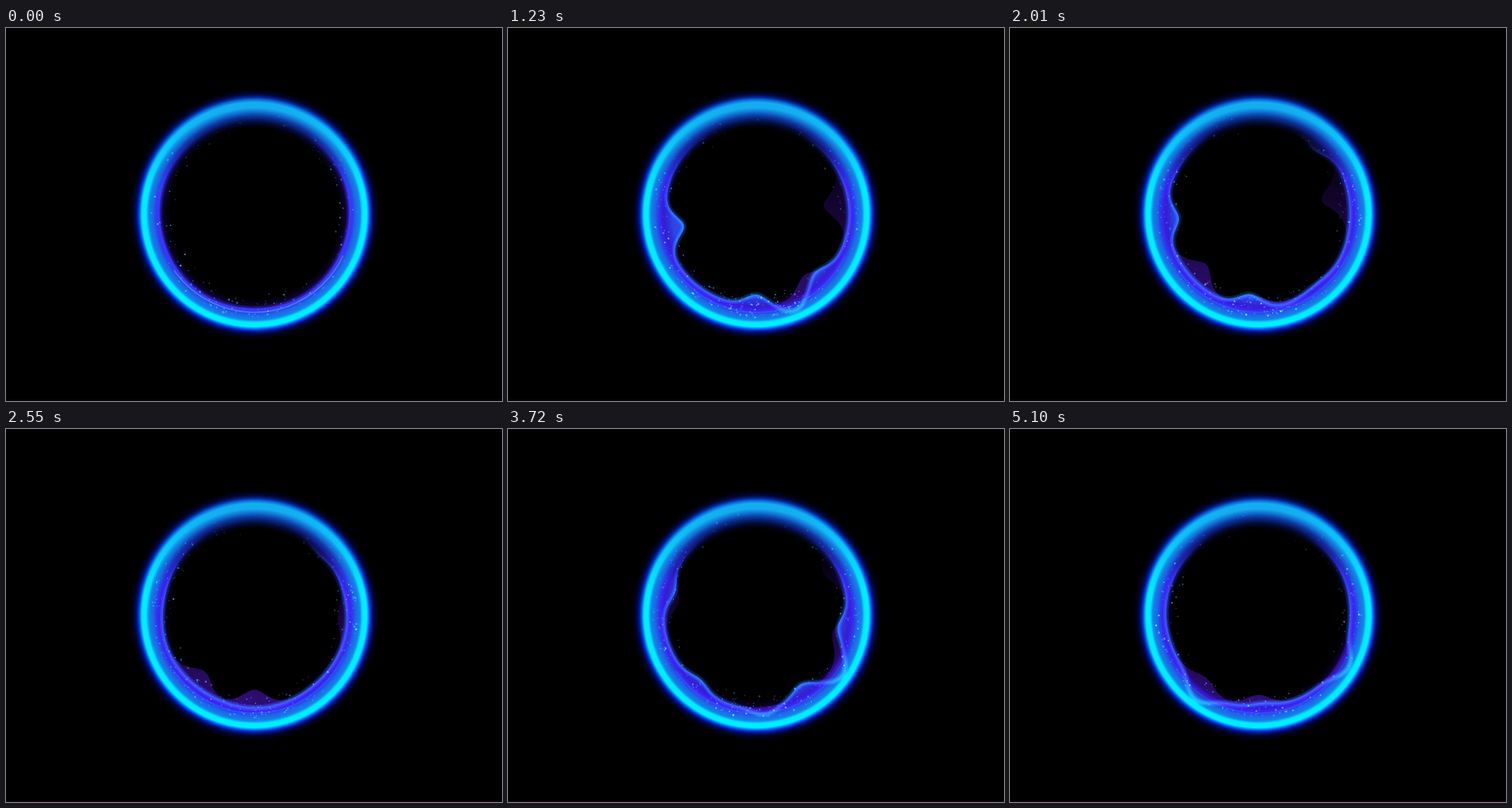
Animation of 658 by 494 pixels, one loop 5130 ms. Source, as an HTML page with a canvas:

```html
<!DOCTYPE html>
<html lang="en">
<head>
<meta charset="utf-8">
<title>Energy ring</title>
<style>
  html, body { margin: 0; width: 100%; height: 100%; overflow: hidden; background: #000; }
  canvas { display: block; }
</style>
</head>
<body>
<canvas id="stage" width="658" height="494"></canvas>
<script>
const W = 658, H = 494, CX = 329.5, CY = 246.5;
const LOOP = 5130, STEP = 30, LIFE = 900;
const TAU = Math.PI * 2, RAD = Math.PI / 180;
const ctx = document.getElementById('stage').getContext('2d');

// Swells in the liquid: peak time in ms, angle in degrees, height towards the centre
const blueSwells = [
  [1500, 173, 27], [1620, 93, 20], [1230, 45, 12], [1230, 68, -15], [2010, 311, 10],
  [3720, 57, 13], [3720, 35, -17], [3720, 84, -11], [3900, 10, 13], [3720, 196, 10],
  [3900, 132, 9], [4500, 82, 10], [5100, 127, -17], [5100, 30, -16]
];
const violetSwells = [
  [1650, 350, 44], [1230, 52, 19], [2200, 134, 27], [2550, 90, 24], [2800, 0, 13],
  [3720, 329, 18], [3900, 12, 19], [3720, 190, 18], [5000, 91, 16], [4900, 131, 15]
];

let seed = 71;
function rnd() {
  seed = (seed * 16807) % 2147483647;
  return seed / 2147483647;
}
const spread = () => rnd() + rnd() + rnd() - 1.5;

// Sparks gather mostly at the bottom, then at the sides and shoulders
const hotSpots = [92, 92, 70, 130, 0, 185, 325, 225];
const sparks = Array.from({ length: 1000 }, (_, i) => ({
  peak: -LIFE / 2 + (LOOP + LIFE) * rnd(),
  angle: hotSpots[i % hotSpots.length] + 38 * spread(),
  radius: 135 - 27 * rnd() ** 1.5,
  size: 0.5 + 0.8 * rnd() ** 2,
  alpha: 0.2 + 0.7 * rnd(),
  phase: TAU * rnd()
}));

// stops: [position, 'r,g,b', alpha]
function addStops(gradient, stops, scale) {
  for (const [at, rgb, a] of stops) gradient.addColorStop(at / scale, `rgba(${rgb},${a})`);
  return gradient;
}
const radial = (c, stops) => addStops(c.createRadialGradient(CX, CY, 0, CX, CY, 170), stops, 170);
const vertical = (c, stops) => addStops(c.createLinearGradient(0, 0, 0, H), stops, H);

function layer() {
  const canvas = document.createElement('canvas');
  canvas.width = W;
  canvas.height = H;
  return canvas.getContext('2d');
}
function masked(stops, mask) {
  const c = layer();
  c.fillStyle = radial(c, stops);
  c.fillRect(0, 0, W, H);
  c.globalCompositeOperation = 'destination-in';
  c.fillStyle = vertical(c, mask);
  c.fillRect(0, 0, W, H);
  return c.canvas;
}

// Crisp cyan ring below, softer and wider band at the top
const ring = layer();
ring.globalCompositeOperation = 'lighter';
ring.drawImage(masked([
  [112, '30,8,90', 0], [121, '42,12,140', 0.3], [126, '64,24,240', 0.7], [130, '46,60,235', 0.7],
  [134, '28,105,228', 0.9], [140, '22,130,232', 1], [142, '8,185,248', 1], [143.5, '0,235,255', 1],
  [149, '0,240,255', 1], [151, '0,150,255', 1], [153, '0,65,240', 1], [156, '0,25,175', 0.75],
  [160, '0,10,110', 0.4], [167, '0,0,60', 0]
], [[105, '0,0,0', 0], [220, '0,0,0', 1]]), 0, 0);
ring.drawImage(masked([
  [114, '0,10,70', 0], [122, '0,30,120', 0.5], [130, '8,70,180', 0.85], [136, '16,120,215', 1],
  [141, '20,172,238', 1], [148, '18,174,240', 1], [152, '8,100,215', 1], [155, '0,45,170', 0.85],
  [159, '0,15,110', 0.5], [167, '0,0,50', 0]
], [[105, '0,0,0', 1], [220, '0,0,0', 0]]), 0, 0);

const blueFill = radial(ctx, [
  [95, '40,105,255', 0.85], [112, '48,72,252', 0.92], [124, '58,42,245', 0.95], [134, '45,70,240', 0.9]
]);
const violetFill = vertical(ctx, [
  [160, '40,10,105', 0.1], [240, '45,11,110', 0.45], [320, '50,14,120', 0.75], [380, '58,18,150', 0.85]
]);
const edge = vertical(ctx, [
  [140, '20,100,255', 0], [180, '20,105,255', 0.3], [230, '25,120,255', 0.8], [380, '30,140,255', 0.9]
]);
const topShade = vertical(ctx, [[135, '0,0,0', 1], [160, '0,0,0', 0.72], [200, '0,0,0', 0]]);

const smooth = x => x * x * (3 - 2 * x);
const pulse = dt => Math.abs(dt) < LIFE ? Math.cos(dt / LIFE * Math.PI / 2) : 0;
const stir = t => smooth(Math.min(1, t / LIFE));

function waveLine(swells, t, width, drift) {
  const path = new Path2D();
  const rest = 126 - 4 * stir(t);
  for (let a = 0; a < 360; a += 1.5) {
    let r = rest - 0.8 * Math.sin(a * 5 * RAD + t / 260);
    for (const [peak, angle, height] of swells) {
      const dt = t - peak;
      const d = ((a - angle - dt * drift + 900) % 360 - 180) / width;
      r -= pulse(dt) * height * Math.exp(-d * d);
    }
    path.lineTo(CX + r * Math.cos(a * RAD), CY + r * Math.sin(a * RAD));
  }
  path.closePath();
  return path;
}

function fillBand(line, style) {
  const band = new Path2D(line);
  band.moveTo(CX + 142, CY);
  band.arc(CX, CY, 142, 0, TAU);
  ctx.fillStyle = style;
  ctx.fill(band, 'evenodd');
}

function drawSparks(t) {
  ctx.fillStyle = 'rgb(60,190,220)';
  for (const p of sparks) {
    const dt = t - p.peak;
    const glow = pulse(dt);
    if (!glow) continue;
    const a = (p.angle + dt * 0.008) * RAD;
    const r = p.radius + 2 * Math.sin(dt / 300 + p.phase);
    const y = CY + r * Math.sin(a);
    ctx.globalAlpha = p.alpha * glow * Math.min(1, Math.max(0.4, (y - 100) / 110));
    ctx.beginPath();
    ctx.arc(CX + r * Math.cos(a), y, p.size, 0, TAU);
    ctx.fill();
  }
  ctx.globalAlpha = 1;
}

function draw(t) {
  const blue = waveLine(blueSwells, t, 11, 0.008);
  const violet = waveLine(violetSwells, t, 13, -0.008);
  ctx.fillStyle = '#000';
  ctx.fillRect(0, 0, W, H);
  fillBand(violet, violetFill);
  fillBand(blue, blueFill);
  ctx.fillStyle = topShade;
  ctx.fillRect(0, 0, W, 201);
  ctx.drawImage(ring.canvas, 0, 0);

  ctx.globalCompositeOperation = 'lighter';
  ctx.strokeStyle = edge;
  for (const width of [8, 5, 2]) {
    ctx.lineWidth = width;
    ctx.globalAlpha = 0.06 + 0.12 * stir(t);
    ctx.stroke(blue);
  }
  // Thin bright seam along the lower inside of the ring, strongest at rest
  ctx.globalAlpha = 0.55 - 0.4 * stir(t);
  ctx.lineWidth = 1.6;
  ctx.beginPath();
  ctx.arc(CX, CY, 130, 25 * RAD, 145 * RAD);
  ctx.stroke();
  drawSparks(t);
  ctx.globalCompositeOperation = 'source-over';

  ctx.fillStyle = 'rgb(9,1,4)';
  ctx.fillRect(0, 491, W, 3);
}

const start = performance.now();
function tick() {
  const t = (performance.now() - start) % LOOP;
  draw(Math.floor(t / STEP) * STEP);
  requestAnimationFrame(tick);
}
tick();
</script>
</body>
</html>
```
